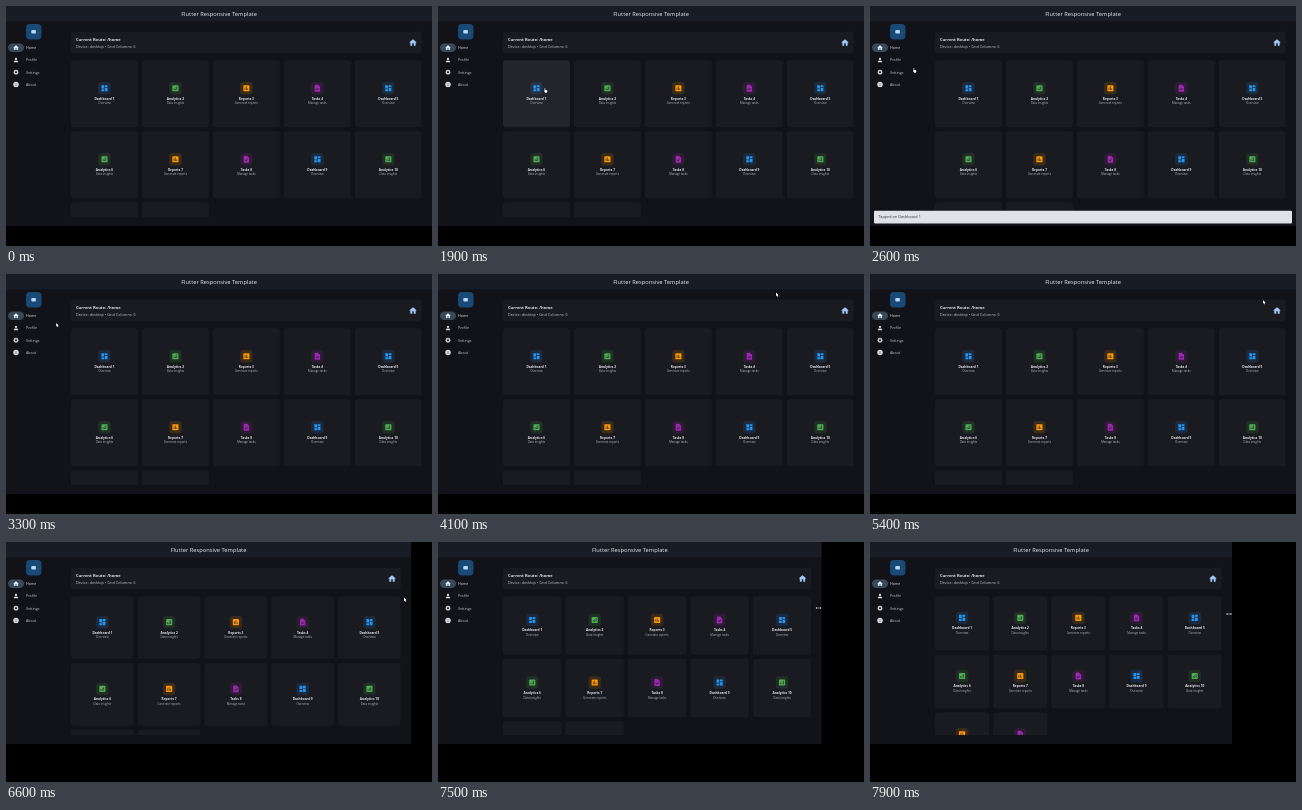
These frames come from a looping animation (426x240 px, 8000 ms). An HTML page with a canvas:

```html
<!DOCTYPE html>
<html lang="en">
<head>
<meta charset="utf-8">
<style>
html, body { margin: 0; width: 100%; height: 100%; overflow: hidden; background: #000; }
canvas { display: block; width: 426px; height: 240px; }
</style>
</head>
<body>
<canvas></canvas>
<script>
const canvas = document.querySelector('canvas');
const ctx = canvas.getContext('2d');
const dpr = window.devicePixelRatio || 1;
canvas.width = 426 * dpr;
canvas.height = 240 * dpr;

const LOOP = 8000, STEP = 100;
const LEFT = 65, GAP = 4, COLUMNS = 5;

// Icons on a 24 unit grid
const sheet = 'M19 3H5q-2 0-2 2v14q0 2 2 2h14q2 0 2-2V5q0-2-2-2z';
const icons = {
  home: 'M10 20v-6h4v6h5v-8h3L12 3 2 12h3v8z',
  person: 'M16 8a4 4 0 1 0-8 0a4 4 0 1 0 8 0zM12 14c-2.7 0-8 1.3-8 4v2h16v-2c0-2.7-5.3-4-8-4z',
  settings: gearPath(),
  info: 'M22 12a10 10 0 1 0-20 0a10 10 0 1 0 20 0zM13 17h-2v-6h2zM13 9h-2V7h2z',
  dashboard: 'M3 13h8V3H3zM3 21h8v-6H3zM13 21h8V11h-8zM13 3v6h8V3z',
  analytics: sheet + 'M9 17H7v-5h2zM13 17h-2v-3h2zM13 12h-2v-2h2zM17 17h-2V7h2z',
  reports: sheet + 'M9 17H7v-7h2zM13 17h-2V7h2zM17 17h-2v-4h2z',
  tasks: 'M14 2H6q-2 0-2 2v16q0 2 2 2h12q2 0 2-2V8zM11 18l-4-4 1.4-1.4 2.6 2.6 5-5 1.4 1.4z',
};
for (const name in icons) icons[name] = new Path2D(icons[name]);

const kinds = [
  ['Dashboard', 'Overview', 'dashboard', '#2196f3'],
  ['Analytics', 'Data insights', 'analytics', '#4caf50'],
  ['Reports', 'Generate reports', 'reports', '#ff9800'],
  ['Tasks', 'Manage tasks', 'tasks', '#9c27b0'],
];
const nav = [['Home', 'home'], ['Profile', 'person'], ['Settings', 'settings'], ['About', 'info']];

// Pointer stops: time, x, y
const stops = [
  [900, 190, -8], [1000, 188, 2], [1300, 160, 60], [1800, 106, 82], [2200, 106, 82],
  [2600, 43, 62], [3200, 40, 50], [4100, 338, 18.5], [5000, 389, 22], [5400, 393, 26],
  [5800, 411, 5], [5900, 413, -8], [6200, 408, -8], [6600, 398, 55.5],
  [7000, 402, 60], [7100, 402, 60], [7900, 359, 72],
];

function gearPath() {
  let d = '';
  for (let i = 0; i < 32; i++) {
    const a = (i - 0.5) * Math.PI / 16, r = i % 4 < 2 ? 10 : 7.4;
    d += (i ? 'L' : 'M') + (12 + r * Math.cos(a)) + ' ' + (12 + r * Math.sin(a));
  }
  return d + 'zM15.5 12a3.5 3.5 0 1 0-7 0a3.5 3.5 0 1 0 7 0z';
}

const clamp = v => Math.max(0, Math.min(1, v));
const smooth = v => v * v * (3 - 2 * v);

function pointerAt(t) {
  let i = stops.findIndex(s => s[0] > t);
  if (i < 0) i = stops.length;
  const a = stops[Math.max(0, i - 1)], b = stops[Math.min(i, stops.length - 1)];
  const k = a === b ? 0 : smooth((t - a[0]) / (b[0] - a[0]));
  return { x: a[1] + (b[1] - a[1]) * k, y: a[2] + (b[2] - a[2]) * k };
}

function box(x, y, w, h, r, color) {
  ctx.fillStyle = color;
  ctx.beginPath();
  ctx.roundRect(x, y, w, h, r);
  ctx.fill();
}

// Laid out at ten times the size so that small advances stay exact
function text(str, x, y, size, color, align = 'left', weight = 400) {
  ctx.save();
  ctx.translate(x, y);
  ctx.scale(0.1, 0.1);
  ctx.font = `${weight} ${size * 10}px "Open Sans", "Noto Sans", sans-serif`;
  ctx.textAlign = align;
  ctx.fillStyle = color;
  ctx.fillText(str, 0, 0);
  ctx.restore();
}

function shape(path, x, y, scale, color, outline) {
  ctx.save();
  ctx.translate(x, y);
  ctx.scale(scale, scale);
  if (outline) {
    ctx.strokeStyle = outline;
    ctx.lineWidth = 2;
    ctx.stroke(path);
  }
  ctx.fillStyle = color;
  ctx.fill(path, 'evenodd');
  ctx.restore();
}

function icon(name, x, y, size, color) {
  shape(icons[name], x - size / 2, y - size / 2, size / 24, color);
}

function drawRail() {
  box(20, 18, 15.5, 15.5, 4, '#194975');
  box(25.3, 23.9, 4.6, 3.6, 0.8, '#b9d6f5');
  box(2, 37.6, 16, 8.4, 4.2, '#3b4858');
  nav.forEach(([label, name], i) => {
    const y = 41.8 + i * 12.2;
    icon(name, 10, y, 6.6, i ? '#d5d8de' : '#e6eeff');
    text(label, 20, y + 1.4, 3.65, i ? '#c8cad0' : '#e6e7ed');
  });
}

function drawCard(i, size, pointer) {
  const [title, detail, name, color] = kinds[i % 4];
  const x = LEFT + (i % COLUMNS) * (size + GAP);
  const y = 54.3 + Math.floor(i / COLUMNS) * (size + GAP);
  const cx = x + size / 2, cy = y + size / 2;
  const hover = pointer.x > x && pointer.x < x + size && pointer.y > y && pointer.y < y + size;
  box(x, y, size, size, 3, hover ? '#23252a' : '#1a1b20');
  box(cx - 6.2, cy - 11.7, 12.4, 12.4, 3, color + '22');
  icon(name, cx, cy - 5.5, 8.2, color);
  text(`${title} ${i + 1}`, cx, cy + 5.9, 3.2, '#e6e7ed', 'center', 700);
  text(detail, cx, cy + 10.6, 2.9, '#b4b7be', 'center');
  return hover;
}

function drawSnackbar(t) {
  const alpha = clamp((t - 1900) / 200) * clamp((3200 - t) / 200);
  if (!alpha) return;
  ctx.globalAlpha = alpha;
  box(4, 204.7, 418, 12.7, 1, '#e1e2e9');
  text('Tapped on Dashboard 1', 8.5, 212.4, 3.8, '#2e3036');
  ctx.globalAlpha = 1;
}

const arrow = new Path2D('M0 0V14L3.5 11 6 16.5 8.3 15.5 6 10H10z');
const hand = new Path2D('M3 0Q5 0 5 2V7L11 8.5Q13 9 12.5 12L11 18H4L0 11Q0 9 2 10V2Q2 0 3 0z');
const resize = new Path2D('M-11 0L-6-4V-1H6V-4L11 0 6 4V1H-6V4z');

function drawPointer({ x, y }, t, overCard) {
  const overNav = x < 46 && y > 37 && y < 85;
  const path = t >= 7000 ? resize : overCard || overNav ? hand : arrow;
  shape(path, x, y, 0.27, '#fff', '#000');
}

function draw(t) {
  const restored = t >= 6000;
  const width = restored ? 405 - 43 * clamp((t - 7100) / 800) : 426;
  const height = restored ? 202 : 220;
  const right = width - 10.2;
  const pointer = pointerAt(t);

  ctx.setTransform(dpr, 0, 0, dpr, 0, 0);
  ctx.fillStyle = '#000';
  ctx.fillRect(0, 0, 426, 240);
  ctx.fillStyle = '#111318';
  ctx.fillRect(0, 0, width, height);
  ctx.fillStyle = '#181c25';
  ctx.fillRect(0, 0, width, 15.3);
  text('Flutter Responsive Template', width / 2, 10.1, 5.75, '#e6e7ed', 'center');

  drawRail();
  box(LEFT, 25.6, right - LEFT, 22, 3, '#1a1b20');
  text('Current Route: /home', 70, 35.4, 4.1, '#e6e7ed', 'left', 700);
  text('Device: desktop • Grid Columns: 6', 70, 42.3, 3.8, '#c3c6cf');
  icon('home', right - 8.8, 36.6, 9.2, '#a0cafd');

  ctx.save();
  ctx.beginPath();
  ctx.rect(LEFT, 50, right - LEFT, height - 59 + (restored ? 0.3 : 0));
  ctx.clip();
  ctx.beginPath();
  ctx.rect(LEFT, 0, right - LEFT, height - 8.8);
  ctx.clip();
  const size = (right - LEFT - GAP * (COLUMNS - 1)) / COLUMNS;
  let overCard = false;
  for (let i = 0; i < 12; i++) overCard = drawCard(i, size, pointer) || overCard;
  ctx.restore();

  drawSnackbar(t);
  drawPointer(pointer, t, overCard);
}

function tick(now) {
  draw(Math.floor(now % LOOP / STEP) * STEP);
  requestAnimationFrame(tick);
}
requestAnimationFrame(tick);
</script>
</body>
</html>
```
